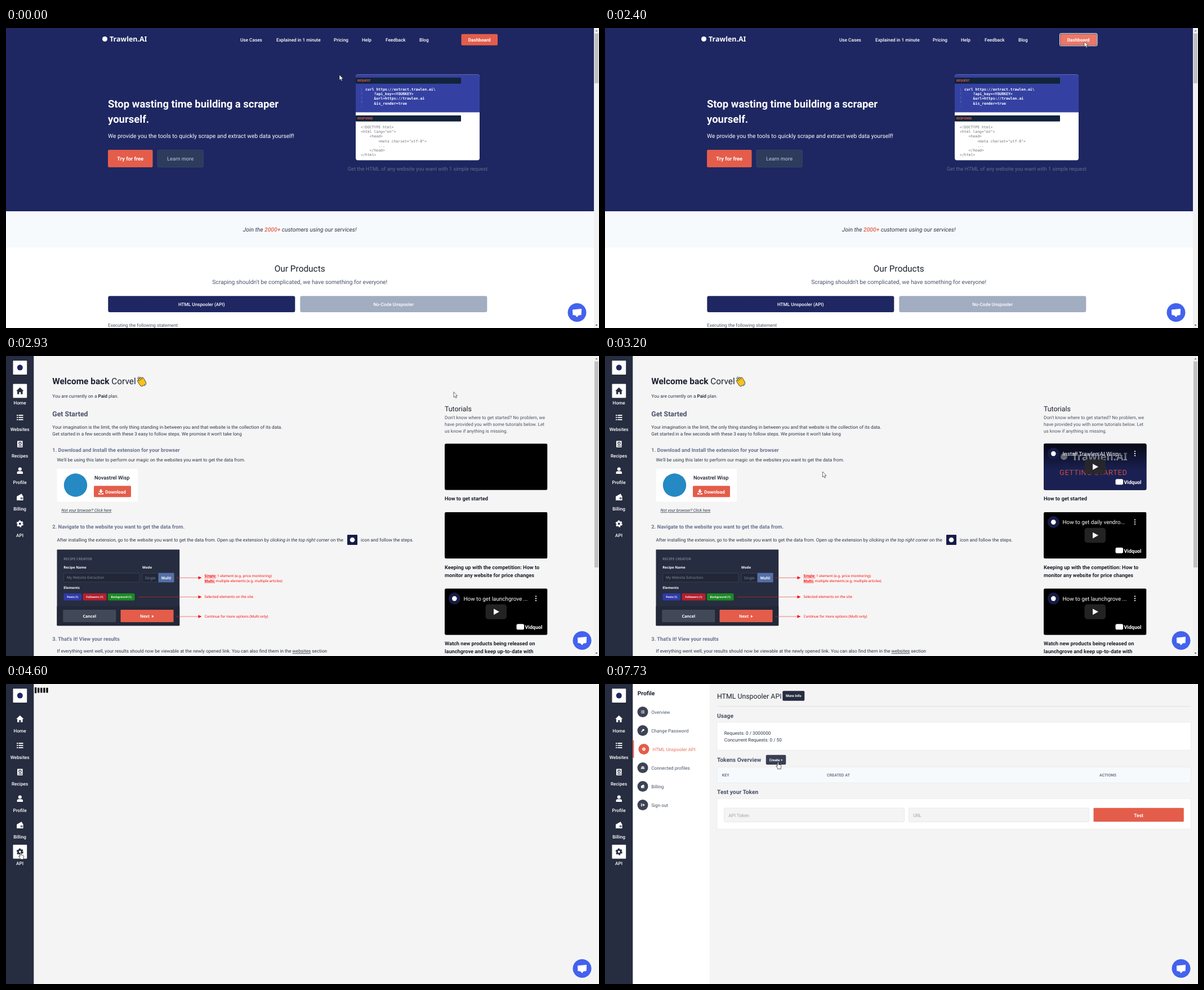
Write an HTML page that moves like this. It is 1053 px wide and 532 px high and loops after 8000 ms.

```html
<!DOCTYPE html>
<html lang="en">
<head>
<meta charset="utf-8">
<title>Product walkthrough</title>
<style>
  html, body { margin: 0; width: 100%; height: 100%; overflow: hidden; }
  svg#stage { display: block; width: 100vw; height: 100vh; font-family: Roboto, sans-serif; text-rendering: geometricPrecision; }
  .noto { font-family: "Noto Sans", "Open Sans", sans-serif; }
  .code { font-family: "DejaVu Sans Mono", monospace; }
</style>
</head>
<body>
<svg id="stage" viewBox="0 0 1053 532"></svg>
<script>
const CSS_PX = 0.5141; // size of one page pixel on the stage
const NAVY = '#1e2761', DARK = '#272d40', RED = '#e45d4b', INK = '#2d3748', SLATE = '#6b7391';
const MID = 'text-anchor="middle"', NOTO = 'class="noto"', CODE = 'class="code"';

const text = (x, y, s, size = 16, fill = INK, weight = 400, attrs = '') =>
  `<text x="${x}" y="${y}" font-size="${size * CSS_PX}" fill="${fill}" font-weight="${weight}" ${attrs}>${s}</text>`;
const box = (x, y, w, h, fill, rx = 0, attrs = '') =>
  `<rect x="${x}" y="${y}" width="${w}" height="${h}" fill="${fill}" rx="${rx}" ${attrs}/>`;
const dot = (x, y, r, fill) => `<circle cx="${x}" cy="${y}" r="${r}" fill="${fill}"/>`;
const path = (d, fill, attrs = '') => `<path d="${d}" fill="${fill}" ${attrs}/>`;
const group = (x, y, body, attrs = '') => `<g transform="translate(${x} ${y})" ${attrs}>${body}</g>`;
const stroke = (color, width = 0.6) => `stroke="${color}" stroke-width="${width}"`;
const escape = s => s.replace(/</g, '&lt;');

const icons = {
  home: path('M0-6.5L7 0H5V6H1.5V2H-1.5V6H-5V0H-7Z'),
  list: [-5, -1, 3].map(y => `<path d="M-6 ${y}h2.4v2h-2.4zM-2.4 ${y}H6v2H-2.4z"/>`).join(''),
  book: '<path fill-rule="evenodd" d="M-4-6H5V6H-4Q-5 6-5 5V-5Q-5-6-4-6zM3-1.5a2.8 2.8 0 1 0-5.6 0a2.8 2.8 0 1 0 5.6 0zM-3 3V4.3H4V3z"/><circle cy="-1.5" cx=".2" r="1.6"/>',
  user: '<circle cy="-3" r="3.2"/><path d="M-5.5 6V4Q-5.5 1-2.5 1H2.5Q5.5 1 5.5 4V6z"/>',
  wallet: '<path fill-rule="evenodd" d="M-6-1.5L3-6.5L5.5-2H6V6H-6zM5 2a2 2 0 1 0-4 0a2 2 0 1 0 4 0z"/><circle cx="3" cy="2" r=".9"/>',
  gear: '<g fill="none" stroke="currentColor"><circle r="3.5" stroke-width="3"/><circle r="5.4" stroke-width="2" stroke-dasharray="3.2 2.455"/></g>',
  key: '<circle cx="2" cy="-2" r="3.6"/><path d="M-5 5L1-1" stroke="currentColor" stroke-width="3"/>',
  people: '<circle cx="-3.5" cy="-2" r="2"/><circle cx="3.5" cy="-2" r="2"/><circle cy="-2.5" r="2.4"/><path d="M-6.5 4V1H6.5V4z"/>',
  exit: '<path d="M-6-5H-2V-3H-4V3H-2V5H-6zM-2-1.5H2V-5L7 0L2 5V1.5H-2z"/>',
};
icons.home = icons.home.replace('fill="undefined"', '');
const icon = (name, x, y, color, scale = 1) =>
  `<g transform="translate(${x} ${y}) scale(${scale})" fill="${color}" color="${color}">${icons[name]}</g>`;

const chat = x => group(x, 504.5, dot(0, 0, 16.5, '#4362ee') +
  path('M-7.5-4.5L7.5-6L7 4L2 4.6L0 7.5L-2.5 4.6L-7 4Z', '#fff', `${stroke('#fff', 1.2)} stroke-linejoin="round"`));
const scrollbar = bottom => box(1044, 0, 9, 532, '#f1f1f1') + box(1045, 9.5, 7, bottom - 9.5, '#c1c1c1') +
  path('M1046.5 6L1048.5 3.5L1050.5 6z', '#777') + path('M1046.5 526L1048.5 528.5L1050.5 526z', '#555');

function landing() {
  const nav = [[416, 'Use Cases'], [480, 'Explained in 1 minute'], [582, 'Pricing'], [632, 'Help'], [674, 'Feedback'], [734, 'Blog']];
  const request = [[638, 'curl https://extract.trawlen.ai\\'], [653.6, '?api_key=<YOURKEY>'], [653.6, '&amp;url=https://trawlen.ai'], [653.6, '&amp;is_render=true']];
  const response = [[630, '<!DOCTYPE html>'], [630, '<html lang="en">'], [645.6, '<head>'], [661.2, '<meta charset="utf-8">'], [661.2, '...'], [645.6, '</head>'], [630, '</html>']];
  return box(0, 0, 1053, 532, '#fff') + box(0, 0, 1044, 325, NAVY) + box(0, 325, 1044, 64.5, '#f7fafc') +
    dot(175.5, 19.5, 4.5, '#fff') + text(184, 24.3, 'Trawlen.AI', 24.2, '#fff', 700, NOTO) +
    nav.map(([x, s]) => text(x, 24, s, 16, '#fff', 500)).join('') +
    `<g id="focus">${box(807.5, 9.7, 66.5, 22, '#fff', 2, stroke('#fff', 1))}${box(808, 10.3, 65.4, 20.9, '#111b35', 1.5)}</g>` +
    box(808.5, 10.7, 64.5, 20, RED, 2, 'id="dash"') + text(840.6, 24, 'Dashboard', 16, '#fff', 700, MID) +
    text(181, 140.5, 'Stop wasting time building a scraper', 36, '#fff', 700) +
    text(181, 168, 'yourself.', 36, '#fff', 700) +
    text(181, 195, 'We provide you the tools to quickly scrape and extract web data yourself!', 20, '#fff') +
    box(181, 216, 79.5, 31, RED, 2) + text(220.7, 235, 'Try for free', 18, '#fff', 700, MID) +
    box(269, 216.3, 81.3, 30.5, '#2d3b5c', 2, stroke('#46536f')) + text(309.6, 235, 'Learn more', 18, '#a0aec0', 500, MID) +
    box(621, 82.5, 220, 152, '#fff', 4) + path('M621 149.5V86.5q0-4 4-4H837q4 0 4 4V149.5z', '#3441a2') +
    [['REQUEST', 88], ['RESPONSE', 155]].map(([s, y]) =>
      box(621, y, 187, 10.7, '#12233b', 1) + text(624, y + 7.2, s, 10.6, RED, 700)).join('') +
    request.map(([x, s], i) => text(x, 111 + i * 8.2, escape(s), 12.6, '#fff', 700, CODE)).join('') +
    [1, 2, 3, 4, '~'].map((n, i) => text(629.5, 110.5 + i * 7.6, n, 12, '#5f69b4', 400, CODE)).join('') +
    response.map(([x, s], i) => text(x, 178 + i * 8.2, escape(s), 12.6, '#6f7278', 400, CODE)).join('') +
    text(731, 253, 'Get the HTML of any website you want with 1 simple request', 18, '#646c88', 400, MID) +
    text(521.7, 361, `Join the <tspan fill="${RED}" font-weight="500">2000+</tspan> customers using our services!`, 20, INK, 400, `${MID} font-style="italic"`) +
    text(521.7, 431.5, 'Our Products', 30, '#1a202c', 400, MID) +
    text(521.7, 454, "Scraping shouldn't be complicated, we have something for everyone!", 20, '#4a5568', 400, MID) +
    box(181.3, 475.3, 332, 28.7, NAVY, 3) + text(347.3, 493, 'HTML Unspooler (API)', 16, '#fff', 500, MID) +
    box(522.3, 475.3, 332, 28.7, '#a2adc1', 3) + text(688.2, 493, 'No-Code Unspooler', 16, '#fff', 500, MID) +
    text(181, 530, 'Executing the following statement', 16, '#4a5568') + scrollbar(98) + chat(1014);
}

function sidebar(active) {
  const items = [['home', 'Home'], ['list', 'Websites'], ['book', 'Recipes'], ['user', 'Profile'], ['wallet', 'Billing'], ['gear', 'API']];
  return box(0, 0, 49.3, 532, DARK) + box(12.5, 8.3, 24.7, 24.7, '#fff', 1) + dot(24.8, 20.6, 5, NAVY) +
    items.map(([name, label], i) => {
      const y = 62 + i * 47.1, on = label === active;
      return (on ? box(12.5, y - 12.5, 24.7, 24.7, '#fff', 1) : '') + icon(name, 24.8, y, on ? DARK : '#fff', 0.95) +
        text(24.6, y + 23.8, label, 16, '#fff', 500, MID);
    }).join('');
}

const art = [
  box(0, 0, 183, 83, '#1a2152') + dot(36, 23, 6, '#a3a7b8') + text(50, 30, 'Trawlen.AI', 36, '#b9bcc9', 700, NOTO) +
    text(28, 56, 'GETTING STARTED', 25, '#c94f45', 400, 'letter-spacing=".7"'),
  box(0, 0, 183, 83, '#f4f4f3') + box(0, 0, 183, 9, '#39414f') +
    box(18, 27, 56, 15, '#34363a', 7) + box(37, 22, 18, 7, '#222', 2) + box(14, 41, 66, 9, '#25272a', 4) +
    box(18, 48, 58, 33, '#b9babb', 5) + box(34, 47, 26, 33, '#24262b', 2) + box(40, 51, 14, 9, '#8fa6b4') + dot(47, 69, 3, '#b43c34') +
    [14, 20, 29, 35, 41, 47, 56, 62, 68].map((y, i) => box(92, y, 42 - i * 7 % 17, 1.4, '#a5a8ad')).join('') +
    [18, 24, 30].map(y => box(152, y, 25, 1.4, '#b0b3b5')).join('') +
    box(154, 43, 24, 4, '#edc954', 1) + box(154, 50, 24, 4, '#e3a441', 1),
  box(0, 0, 183, 83, '#eef0f2') + box(36, 17, 104, 66, '#fff') +
    [20, 30, 40, 50, 62, 74].map((y, i) => box(41, y, 7, 6, ['#6c55a8', '#e5673f', '#3974bd'][i % 3]) +
      box(52, y, 30, 1.5, '#888') + box(52, y + 3, 45, 1, '#bbb') + box(135, y, 4, 5, '#e36858')).join('') +
    box(146, 19, 29, 64, '#fff') + [24, 35, 46, 57].map(y => dot(151, y, 2, '#9a77a6') + box(156, y, 15, 1.2, '#aaa')).join(''),
];

function thumbnail(i, y, title) {
  return group(779, y, box(0, 0, 182.5, 82.5, '#000') +
    `<g id="art${i}">${art[i]}${box(0, 0, 183, 48, 'url(#shade)')}</g><g id="ui${i}">` +
    dot(17.3, 17.8, 10.5, '#171c46') + dot(17.3, 17.8, 4.3, '#fff') + text(33.5, 21.3, title, 19.2, '#fff') +
    [13.8, 17.6, 21.4].map(cy => dot(162, cy, 1.1, '#fff')).join('') +
    box(72.5, 28, 37.5, 26.5, '#282828', 5, 'opacity=".88"') + path('M87 36V46.6L97 41.3z', '#fff') +
    box(127.5, 63, 13.5, 10, '#fff', 2.5) + text(142.5, 72, 'Vidquol', 17.5, '#fff', 700) + '</g>', 'clip-path="url(#round)"');
}

function recipePanel() {
  const badge = (x, w, s, fill) => box(x, 421, w, 12.5, fill, 2) + text(x + w / 2, 429.2, s, 9.4, '#fff', 700, `${MID} ${NOTO}`);
  const arrow = (x, y) => path(`M${x} ${y}H342`, 'none', stroke('#e22', 0.6)) + path(`M341.5 ${y - 2.7}L347.5 ${y}L341.5 ${y + 2.7}z`, '#f00');
  const note = (y, s) => text(352.5, y, s, 12.25, '#f00', 400, NOTO);
  const key = s => `<tspan font-weight="700" text-decoration="underline">${s}</tspan>`;
  const label = (x, y, s) => text(x, y, s, 12, '#fff', 600, NOTO);
  return box(90.5, 343.3, 217.7, 135, DARK, 1) + box(90.5, 443.5, 217.7, 34.8, '#232838', 1) +
    text(102.3, 362, 'RECIPE CREATOR', 12, '#737a8c', 600, NOTO) +
    label(102.3, 377, 'Recipe Name') + label(242, 377, 'Mode') + label(102.3, 413.3, 'Elements') +
    box(102.5, 385, 134.5, 16, '#222737', 1, stroke('#454c60')) + text(108, 395.4, 'My Website Extraction', 12.4, '#848b9b', 400, NOTO) +
    box(242, 385, 56, 16, '#222737', 1, stroke('#454c60')) + box(270.5, 384.8, 28, 16.4, '#5570a8', 1) +
    text(256.3, 395.6, 'Single', 13, '#7b86a4', 400, `${MID} ${NOTO}`) + text(284.5, 395.6, 'Multi', 13, '#fff', 700, `${MID} ${NOTO}`) +
    badge(102.5, 31.5, 'Posts (1)', '#303aa8') + badge(136.5, 42, 'Followers (1)', '#b41f2e') + badge(181, 47.5, 'Background (1)', '#1c8a24') +
    box(101.3, 450, 94, 22, '#414958', 1) + text(148.3, 464, 'Cancel', 14, '#fff', 700, `${MID} ${NOTO}`) +
    box(203.5, 450, 94, 22, RED, 1) + text(246.5, 464, 'Next', 14, '#fff', 700, `${MID} ${NOTO}`) + path('M259 459.5V464L262.7 461.8z', '#fff') +
    arrow(302, 393.3) + arrow(235, 427.3) + arrow(302, 462) +
    note(392, `${key('Single:')} 1 element (e.g. price monitoring)`) + note(400.7, `${key('Multi:')} multiple elements (e.g. multiple articles)`) +
    note(429, 'Selected elements on the site') + note(463.5, 'Continue for more options (Multi only)');
}

function wavingHand() {
  const finger = (x, top) => box(x, top, 3, 9, '#fcc21b', 1.5, stroke('#2b3a55', 0.8));
  return `<g transform="translate(241 45.5) rotate(-32)">${finger(-6, -6)}${finger(-3, -8.5)}${finger(0, -8)}${finger(3, -6)}
    ${box(-6, -1.5, 12, 9, '#fcc21b', 4, stroke('#2b3a55', 0.8))}${box(-5.4, -3, 10.8, 5, '#fcc21b')}</g>` +
    path('M233 40q1-3 4-3.5M245 53q3-.5 4-3.5', 'none', stroke('#3b88c3', 1));
}

function dashboard() {
  const heading = (y, s) => text(82.3, y, s, 18, SLATE, 700);
  const titles = [[256, 'How to get started'], [377.5, 'Keeping up with the competition: How to'], [391.5, 'monitor any website for price changes'],
    [513, 'Watch new products being released on'], [527.3, 'launchgrove and keep up-to-date with']];
  return box(0, 0, 1053, 532, '#f5f5f5') + sidebar('Home') +
    text(82.3, 50, '<tspan font-weight="700">Welcome back</tspan> Corvel', 30, '#1a202c') + wavingHand() +
    text(82.3, 73.5, 'You are currently on a <tspan font-weight="700">Paid</tspan> plan.') +
    text(82.3, 106.5, 'Get Started', 24, '#4a5068', 700) +
    text(82.3, 128.5, 'Your imagination is the limit, the only thing standing in between you and that website is the collection of its data.') +
    text(82.3, 140.8, "Get started in a few seconds with these 3 easy to follow steps. We promise it won't take long") +
    heading(170.2, '1. Download and Install the extension for your browser') +
    text(90.5, 187.3, "We'll be using this later to perform our magic on the websites you want to get the data from.") +
    box(90.5, 200, 143.5, 58.5, '#fff') + dot(123.5, 229, 20.7, '#2589c4') +
    text(157, 218.5, 'Novastrel Wisp', 18, '#1a202c', 500) + box(156, 230.3, 66, 20, RED, 1.5) +
    path('M167 236.5h3v3h2.5l-4 3.8l-4-3.8H167zM164 243h2l2.5 2l2.5-2h2v2.5h-9z', '#fff') + text(176.3, 243.8, 'Download', 16, '#fff', 700) +
    text(98.5, 276.3, 'Not your browser? Click here', 14, INK, 400, 'font-style="italic" text-decoration="underline"') +
    heading(305.7, '2. Navigate to the website you want to get the data from.') +
    text(90.5, 328.5, 'After installing the extension, go to the website you want to get the data from. Open up the extension by <tspan font-style="italic">clicking in the top right corner</tspan> on the') +
    box(606, 317, 18, 18, '#171c46', 1) + dot(615, 326, 4.3, '#fff') + text(630, 328.5, 'icon and follow the steps.') +
    recipePanel() + heading(505.3, "3. That's it! View your results") +
    text(90.5, 526.3, 'If everything went well, your results should now be viewable at the newly opened link. You can also find them in the <tspan text-decoration="underline">websites</tspan> section') +
    text(779, 98.3, 'Tutorials', 24, '#1a202c') +
    ["Don't know where to get started? No problem, we", 'have provided you with some tutorials below. Let', 'us know if anything is missing.']
      .map((s, i) => text(779, 112 + i * 12.2, s, 16, '#4a5568')).join('') +
    thumbnail(0, 155.3, 'Install Trawlen.AI Wisp...') + thumbnail(1, 276.8, 'How to get daily vendro...') + thumbnail(2, 412.3, 'How to get launchgrove ...') +
    titles.map(([y, s]) => text(779, y, s, 18, '#1a202c', 700)).join('') + scrollbar(375) + chat(1023);
}

const loader = () => box(0, 0, 1053, 532, '#f4f4f4') + sidebar('API') +
  [0, 1, 2, 3, 4].map(i => box(51 + i * 5.1, i ? 6.7 : 6, 3.2, i ? 8.8 : 10.3, '#000')).join('') + chat(1023);

function apiPage() {
  const links = [['list', 'Overview'], ['key', 'Change Password'], ['gear', 'HTML Unspooler API'], ['people', 'Connected profiles'], ['wallet', 'Billing'], ['exit', 'Sign out']];
  const card = (y, h, fill = '#fff') => box(199, y, 841.5, h, fill, 1, stroke('#e2e4e8'));
  const title = (y, s) => text(199, y, s, 20, '#4a5068', 700);
  const field = (x, s) => box(x, 220, 320, 24.5, '#f4f4f4', 1.5, stroke('#dcdee2')) + text(x + 7.7, 235.6, s, 16, '#9ea4b0');
  const column = (x, s) => text(x, 163.7, s, 13.8, '#6f7890', 700);
  return box(0, 0, 1053, 532, '#f4f4f4') + box(49.3, 0, 136.7, 532, '#fff') + sidebar('API') +
    text(57.7, 19.7, 'Profile', 20, '#1a202c', 700) + box(49.3, 100, 2, 31, RED) +
    links.map(([name, s], i) => {
      const y = 49.5 + i * 33, on = name === 'gear', x = on ? 69 : 67;
      return dot(x, y, 9.5, on ? RED : '#3c4354') + icon(name, x, y, '#fff', 0.5) + text(x + 15.2, y + 3, s, 16, on ? '#e8705f' : '#4a5568');
    }).join('') +
    text(199, 26, 'HTML Unspooler API', 24, '#1a202c') + box(315.3, 12.3, 39, 17.4, DARK, 2) + text(334.8, 23.2, 'More Info', 12.3, '#fff', 700, MID) +
    box(199, 39, 841.5, 0.8, '#dcdde0') + title(60.3, 'Usage') + card(68, 49.3) +
    text(211.8, 90, 'Requests: 0 / 3000000') + text(211.8, 102.3, 'Concurrent Requests: 0 / 50') +
    title(138.3, 'Tokens Overview') + box(285.8, 125.8, 35.5, 17.3, DARK, 2, 'id="create"') + text(303.5, 136.7, 'Create +', 12.3, '#fff', 700, MID) +
    card(147.3, 28, '#f7fafc') + column(207.7, 'KEY') + column(394, 'CREATED AT') + column(878, 'ACTIONS') +
    title(195, 'Test your Token') + card(203.3, 54) + field(211.5, 'API Token') + field(539.5, 'URL') +
    box(867.5, 219.8, 160.3, 24.5, RED, 1.5) + text(947.6, 235.8, 'Test', 16.5, '#fff', 700, MID) + chat(1023);
}

const pointer = {
  arrow: path('M0 0V9.6L2.2 7.6L3.7 11L5.3 10.3L3.8 7H6.8Z', '#fff', stroke('#111', 0.6)),
  hand: path('M-1 1Q0-.6 1 1V4.5L4.7 5.4Q5.8 5.8 5.7 7L5 10V12.4H-.7V11L-3.2 7.5Q-3.6 6-2.2 6.3L-1 7.3Z', '#fff', `${stroke('#111', 0.7)} stroke-linejoin="round"`),
  beam: path('M-2-5H-.6L0-4.4L.6-5H2M0-4.4V4.4M-2 5H-.6L0 4.4L.6 5H2', 'none', stroke('#222', 0.9)),
};

const scenes = [[0, 'landing', landing], [2467, 'dashboard', dashboard], [4600, 'loader', loader], [4667, 'api', apiPage]];
document.getElementById('stage').innerHTML =
  `<defs><clipPath id="round"><rect width="182.5" height="82.5" rx="3"/></clipPath>
   <linearGradient id="shade" x2="0" y2="1"><stop stop-opacity=".75"/><stop offset="1" stop-opacity="0"/></linearGradient></defs>` +
  scenes.map(([, id, draw]) => `<g id="${id}">${draw()}</g>`).join('') +
  `<g id="cursor">${Object.keys(pointer).map(k => `<g id="${k}">${pointer[k]}</g>`).join('')}</g>`;

// Mouse path: time, x, y
const track = [
  [0, 592, 83], [867, 592, 83], [1130, 690, 92], [1330, 880, 42], [1470, 926, 5], [1600, 878, 13], [1733, 846, 23], [1867, 851, 24],
  [2733, 851, 24], [2933, 797, 63], [3130, 500, 165], [3330, 180, 278], [3600, 56, 295.5], [3867, 35, 304], [4267, 26, 298.5],
  [5200, 26, 298.5], [5470, 150, 215], [5730, 341, 98], [5930, 272, 84], [6067, 254.5, 84.7], [6133, 253, 84.7],
  [6200, 253, 84.7], [6333, 251.7, 84.7], [6533, 251.7, 84.7], [6667, 252.5, 86.5], [7000, 252.5, 86.5],
  [7270, 300, 112], [7467, 345, 134], [7733, 307.3, 138.3], [8000, 307.3, 138.3],
];
function mouseAt(t) {
  const i = track.findIndex(k => k[0] > t);
  const [t0, x0, y0] = track[i - 1], [t1, x1, y1] = track[i];
  const p = (t - t0) / (t1 - t0);
  return [x0 + (x1 - x0) * p, y0 + (y1 - y0) * p];
}

const el = id => document.getElementById(id);
const show = (id, on) => el(id).setAttribute('display', on ? 'inline' : 'none');
const STEP = 200 / 3;

function render(now) {
  const t = Math.floor((now % 8000 + 5) / STEP) * STEP + 1;
  const time = Math.min(t, 7999);
  const scene = scenes.filter(s => s[0] <= time).pop()[1];
  scenes.forEach(s => show(s[1], s[1] === scene));

  const [x, y] = mouseAt(time);
  const inside = (l, top, r, b) => x >= l && x <= r && y >= top && y <= b;
  const onCreate = scene === 'api' && inside(286, 126, 321, 143);
  const onMenu = scene !== 'landing' && inside(12, 285, 37, 323);
  const onText = scene === 'api' && inside(212, 79, 314, 104);
  const shape = onCreate || onMenu ? 'hand' : onText ? 'beam' : 'arrow';
  Object.keys(pointer).forEach(k => show(k, k === shape));
  el('cursor').setAttribute('transform', `translate(${x} ${y})`);

  el('dash').setAttribute('fill', inside(808, 10, 873, 31) ? '#ea7868' : RED);
  el('create').setAttribute('fill', onCreate ? '#393f53' : DARK);
  show('focus', time >= 2333);
  [3067, 3133, 2867].forEach((start, i) => show('ui' + i, time >= start));
  [3200, 3333, 3267].forEach((start, i) => show('art' + i, time >= start));
}

const start = performance.now();
(function frame() {
  render(performance.now() - start);
  requestAnimationFrame(frame);
})();
</script>
</body>
</html>
```
